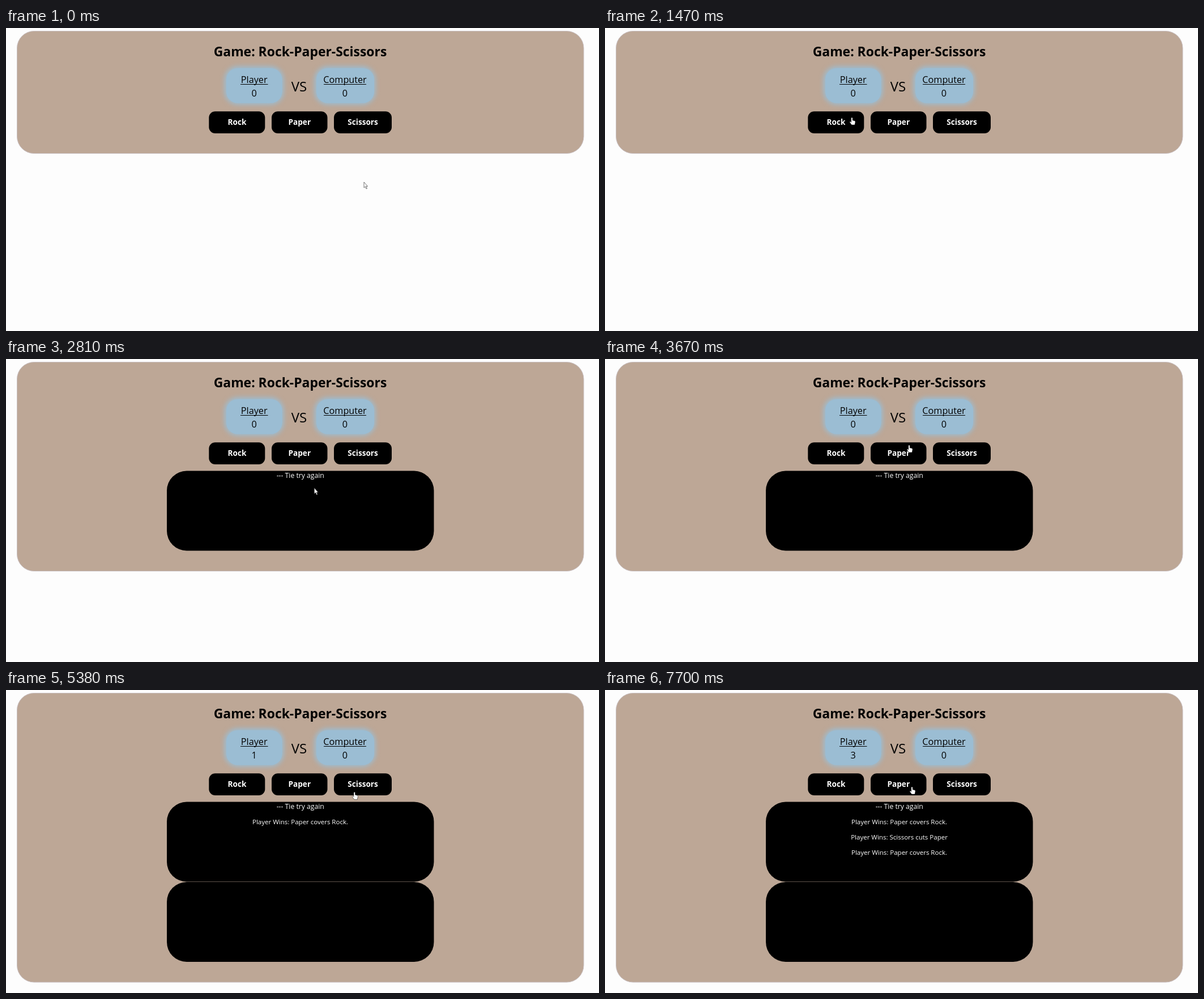
These frames come from a looping animation (1047 by 535 pixels, 8 s). An HTML page:

```html
<!DOCTYPE html>
<html lang="en">
<head>
<meta charset="utf-8">
<title>Rock-Paper-Scissors</title>
<style>
  html, body { margin: 0; width: 100%; height: 100%; overflow: hidden; background: #fdfdfd; }
  svg { display: block; width: 100vw; height: 100vh; }
  text { font-family: "Open Sans", sans-serif; text-anchor: middle; }
  .title { font-size: 22.9px; font-weight: 700; }
  .label { font-size: 16.2px; }
  .button { font: bold 13.6px "Liberation Sans", Arial, sans-serif; fill: #fff; }
  .log text { font-size: 11.5px; fill: #fff; }
  .log .tie { font-size: 12.2px; }
  .score { fill: #9bbdd3; }
  .glow { filter: blur(4px); }
</style>
</head>
<body>
<svg viewBox="0 0 1047 535">
  <rect id="card" x="19.5" y="5.5" width="1000.5" height="216" rx="30" fill="#bda796" stroke="#c9c0c2"/>
  <text class="title" x="519.5" y="50">Game: Rock-Paper-Scissors</text>

  <g class="score">
    <rect class="glow" x="386" y="68" width="104" height="67" rx="23"/>
    <rect x="389" y="71" width="98.500" height="61.500" rx="20"/>
    <rect class="glow" x="545" y="68" width="107" height="67" rx="23"/>
    <rect x="548" y="71" width="102" height="61.500" rx="20"/>
  </g>
  <g class="label">
    <text x="438.2" y="97">Player</text>
    <text x="598.5" y="97">Computer</text>
    <path d="M414 99.500H462.500M561 99.500H636" stroke="#000"/>
    <text id="points" x="438.2" y="121">0</text>
    <text x="598.5" y="121">0</text>
  </g>
  <text x="517.5" y="111.500" font-size="24">VS</text>

  <rect x="358.300" y="147.300" width="99" height="38.700" rx="11"/>
  <rect x="469" y="147.300" width="98.500" height="38.700" rx="11"/>
  <rect x="579" y="147.300" width="102" height="38.700" rx="11"/>
  <g class="button">
    <text x="408" y="171">Rock</text>
    <text x="518.3" y="171">Paper</text>
    <text x="630" y="171">Scissors</text>
  </g>

  <rect data-from="1960" x="284" y="197.500" width="471.500" height="141" rx="35"/>
  <rect data-from="4400" x="284" y="339" width="471.500" height="141" rx="35"/>
  <g class="log">
    <text data-from="1960" class="tie" x="519.7" y="210">--- Tie try again</text>
    <text data-from="4400" x="519.5" y="237">Player Wins: Paper covers Rock.</text>
    <text data-from="6240" x="519.5" y="264">Player Wins: Scissors cuts Paper</text>
    <text data-from="7700" x="519.5" y="291">Player Wins: Paper covers Rock.</text>
  </g>

  <g id="cursor" fill="#fff">
    <path id="arrow" d="M0 0V10L2.300 8 4 12 5.500 11.300 3.900 7.500H6.500Z" stroke="#555" stroke-width=".8"/>
    <path id="hand" d="M-1.300 1.200a1.200 1.200 0 0 1 2.500 0V4.800L5 5.800Q6.300 6.300 6 8.200L5 13H-.5L-3.800 8.500Q-4 6.800-2.700 7L-1.300 8.300Z" stroke="#000" stroke-width=".5"/>
  </g>
</svg>
<script>
const LOOP = 8000, STEP = 122.3;
const byId = id => document.getElementById(id);
const timed = [...document.querySelectorAll('[data-from]')];

// Pointer path: time, x, y
const path = [
  [0, 632, 272], [122, 632, 272], [550, 535, 226], [980, 429, 176], [1470, 436, 158],
  [2080, 436, 158], [2500, 500, 238], [2930, 561, 224], [3300, 555, 146], [3670, 537, 152],
  [4770, 537, 152], [5200, 590, 190], [5630, 650, 167], [5750, 649, 165],
  [6730, 649, 165], [7100, 600, 182], [7460, 542, 171], [8000, 542, 171]
];
const buttons = [[358, 457], [469, 567], [579, 681]];

function pointerAt(time) {
  const i = path.findIndex(p => p[0] > time);
  const [t0, x0, y0] = path[i - 1], [t1, x1, y1] = path[i];
  const k = (time - t0) / (t1 - t0);
  return [x0 + (x1 - x0) * k, y0 + (y1 - y0) * k];
}

function render(t) {
  for (const el of timed) el.style.display = t >= +el.dataset.from ? '' : 'none';
  byId('card').setAttribute('height', t < 1960 ? 216 : t < 4400 ? 369 : 510.5);
  byId('points').textContent = [4400, 6240, 7700].filter(at => t >= at).length;

  // The pointer is sampled in steps, like a screen capture
  const sample = Math.min(LOOP - 1, Math.floor((t + 20) / STEP) * STEP);
  const [x, y] = pointerAt(sample);
  const over = y > 147 && y < 186 && buttons.some(([l, r]) => x > l && x < r);
  byId('cursor').setAttribute('transform', `translate(${x} ${y})`);
  byId('hand').style.display = over ? '' : 'none';
  byId('arrow').style.display = over ? 'none' : '';
}

const start = performance.now();
function tick() {
  render((performance.now() - start) % LOOP);
  requestAnimationFrame(tick);
}
tick();
</script>
</body>
</html>
```
